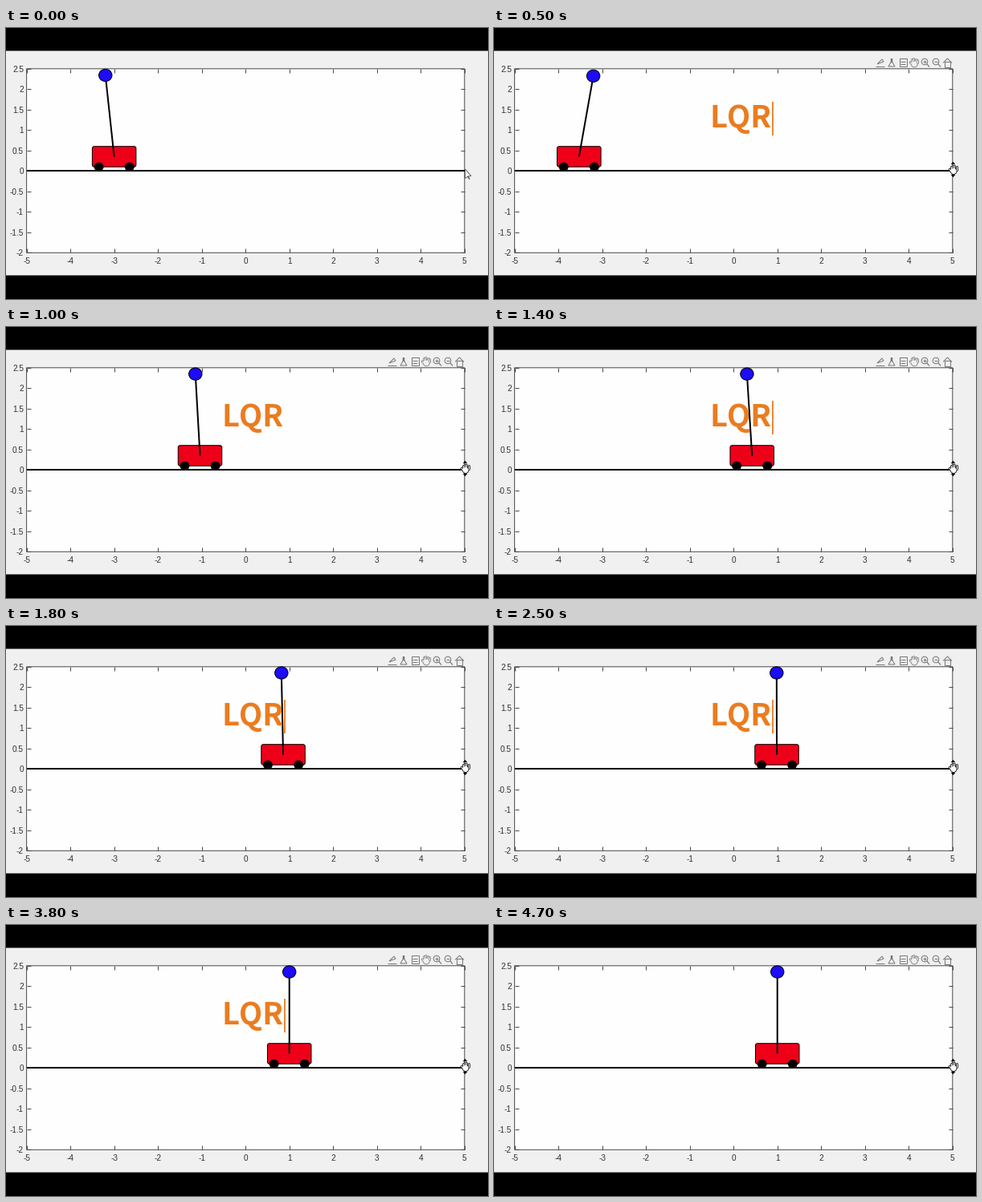
Write a matplotlib script that moves like this. It is 600x338 px and loops after 4800 ms.

```python
import numpy as np
import matplotlib.pyplot as plt
from matplotlib.animation import FuncAnimation
from matplotlib.patches import Circle, Ellipse, FancyBboxPatch, Polygon, Rectangle

W, H, DPI = 600, 338, 100
FRAMES, STEP = 48, 100
PT = 72 / DPI  # points per pixel
LEFT, RIGHT, TOP, BOTTOM = 25.6, 570.8, 50.8, 280.3
SX, SY = (RIGHT - LEFT) / 10, (BOTTOM - TOP) / 4.5
GREY, AXIS, ICON, ORANGE = "#f0f0f0", "#4a4a4a", "#777777", "#ea7c20"

fig = plt.figure(figsize=(W / DPI, H / DPI), dpi=DPI, facecolor="black")
ax = fig.add_axes([0, 0, 1, 1])
ax.set(xlim=(0, W), ylim=(H, 0))
ax.axis("off")


def px(x):
    return LEFT + (x + 5) * SX


def py(y):
    return TOP + (2.5 - y) * SY


def line(xs, ys, color="black", width=1.0, z=2, cap="butt"):
    return ax.plot(xs, ys, color=color, lw=width * PT, zorder=z,
                   solid_capstyle=cap)[0]


def shape(patch, z):
    patch.set_zorder(z)
    return ax.add_patch(patch)


def poly(points, z, face="none", edge="black", width=1.0):
    return shape(Polygon(points, fc=face, ec=edge, lw=width * PT), z)


# Plot area
shape(Rectangle((0, 28.5), W, 280, fc=GREY, snap=False), 0)
shape(Rectangle((LEFT, TOP), RIGHT - LEFT, BOTTOM - TOP, fc="#fefefe",
                ec=AXIS, lw=PT, snap=False), 1)
label = dict(family="Liberation Sans", size=10 * PT, color="#303030")
for v in range(-5, 6):
    x = px(v)
    line([x, x], [BOTTOM, BOTTOM - 5], AXIS)
    line([x, x], [TOP, TOP + 5], AXIS)
    ax.text(x, 291.5, str(v), ha="center", va="center", **label)
for v in np.arange(-2, 2.6, 0.5):
    y = py(v)
    line([LEFT, LEFT + 5], [y, y], AXIS)
    line([RIGHT, RIGHT - 5], [y, y], AXIS)
    ax.text(22, y + 1, f"{v:g}", ha="right", va="center", **label)
line([LEFT, RIGHT], [py(0)] * 2, width=2, z=3)


def hand(cx, cy, edge, fill, z):
    """Open hand: thick strokes for the outline, thin ones for the fill."""
    parts = []
    for layer, (color, grow) in enumerate(((edge, 1.0), (fill, 0))):
        for k in range(4):
            x = cx - 2.4 + 2.2 * k
            top = cy - 5 + abs(k - 1.3)
            parts.append(line([x, x], [cy, top], color, 1.2 + 1.6 * grow,
                              z + layer, "round"))
        parts.append(line([cx - 4.2, cx - 1], [cy, cy + 3], color,
                          1.4 + 1.6 * grow, z + layer, "round"))
        parts.append(shape(Ellipse((cx + 0.8, cy + 2), 7 + 1.6 * grow,
                                   7 + 1.6 * grow, fc=color), z + layer))
    return parts


def lens(cx, plus):
    parts = [shape(Circle((cx, 42), 3.8, fc="none", ec=ICON, lw=PT), 2),
             line([cx + 2.8, cx + 6], [44.8, 48.5], ICON, 1.2),
             line([cx - 2, cx + 2], [42, 42], ICON)]
    if plus:
        parts.append(line([cx, cx], [40, 44], ICON))
    return parts


toolbar = [
    poly([(477, 45), (483, 39), (485, 42)], 2, edge=ICON),
    line([475, 486], [47.5, 47.5], ICON),
    poly([(491, 48), (495, 41), (499, 48)], 2, edge=ICON),
    line([495, 495], [37.5, 43], ICON, 2.5),
    shape(Rectangle((504.5, 38), 9, 10, fc="none", ec=ICON, lw=PT), 2),
    *[line([506, 512], [y, y], ICON) for y in (41.5, 44.5)],
    *hand(522.5, 43, ICON, GREY, 2),
    *lens(536, True),
    *lens(550, False),
    line([559, 564.5, 570], [43.5, 38, 43.5], ICON),
    shape(Rectangle((561, 42), 7, 6.5, fc="none", ec=ICON, lw=PT), 2),
]

# Mouse pointers
arrow = poly([(571.5, 176), (571.5, 187.5), (575, 185), (579, 184.5)], 8,
             "white", "#555555", 0.9)
arrow_tail = line([575, 577], [185, 188.5], "#555555", 1.5, 8)
grab = hand(571.3, 176.5, "black", "white", 9)
for y, way in ((170, -1), (183, 1)):
    grab.append(poly([(569, y), (571.5, y + 3 * way), (574, y)], 8, "black",
                     width=0.3))

# Cart and pendulum
cart = shape(FancyBboxPatch((0, py(0.6)), SX, SY / 2, fc="#ee0019", ec="black",
                            boxstyle="round,pad=0,rounding_size=2.5",
                            lw=PT), 4)
wheels = [shape(Ellipse((0, py(0.1)), 0.2 * SX, 0.2 * SY, fc="black",
                        ec="black", lw=PT), 5) for _ in range(2)]
pole = line([], [], width=2, z=6)
ball = shape(Ellipse((0, 0), 0.3 * SX, 0.3 * SY, fc="#1c0cf8", ec="black",
                     lw=PT), 7)

# Typed title with caret
title = ax.text(268, 124.5, "", family="Noto Sans CJK JP", weight="bold",
                size=38 * PT, color=ORANGE, va="baseline", zorder=11)
caret = line([], [], ORANGE, 1.8, 11)

# Optimal control of the linearised cart-pole: the stable modes of the
# Hamiltonian matrix give the closed-loop motion directly.
MASS, CART, LENGTH, G, DRAG = 1, 5, 2, 10, 1
GOAL, START, SPEED = 1, 0.4, 3.25


def modes():
    a = np.array([[0, 1, 0, 0],
                  [0, -DRAG / CART, MASS * G / CART, 0],
                  [0, 0, 0, 1],
                  [0, -DRAG / (CART * LENGTH),
                   (MASS + CART) * G / (CART * LENGTH), 0]])
    b = np.array([0, 1 / CART, 0, 1 / (CART * LENGTH)])
    cost, effort = np.diag([1, 1, 10, 10]), 1e-4
    rates, vecs = np.linalg.eig(np.block([[a, -np.outer(b, b) / effort],
                                          [-cost, -a.T]]))
    stable = rates.real < 0
    vecs = vecs[:4, stable]
    first = np.array([-3 - GOAL, 0, 0.1, 0])
    return rates[stable], vecs * np.linalg.solve(vecs, first.astype(complex))


RATES, MODES = modes()


def pose(t):
    """Cart position and pole angle at t seconds."""
    s = max(t - START, 0) * SPEED
    x, _, angle, _ = (MODES @ np.exp(RATES * s)).real
    return x + GOAL, angle


def draw(i):
    t = i * STEP / 1000
    x, angle = pose(t)
    tip = (px(x - LENGTH * np.sin(angle)),
           py(0.35 + LENGTH * np.cos(angle)))
    cart.set_x(px(x - 0.5))
    for wheel, dx in zip(wheels, (-0.35, 0.35)):
        wheel.center = px(x + dx), py(0.1)
    pole.set_data([px(x), tip[0]], [py(0.35), tip[1]])
    ball.center = tip

    hover = i >= 2
    for part in (arrow, arrow_tail):
        part.set_visible(not hover)
    for part in toolbar + grab:
        part.set_visible(hover)

    typed = int(np.clip(min(i - 1, 46 - i), 0, 3))
    title.set_text("LQR"[:typed])
    end = title.get_window_extent().x1 * W / fig.bbox.width
    caret.set_data([end + 2] * 2, [92, 134])
    caret.set_visible(typed in (1, 2) or (typed == 3 and 4 <= i % 10 < 9))
    return []


anim = FuncAnimation(fig, draw, frames=FRAMES, interval=STEP, repeat=True,
                     repeat_delay=0, init_func=lambda: draw(0))
plt.show()
```
